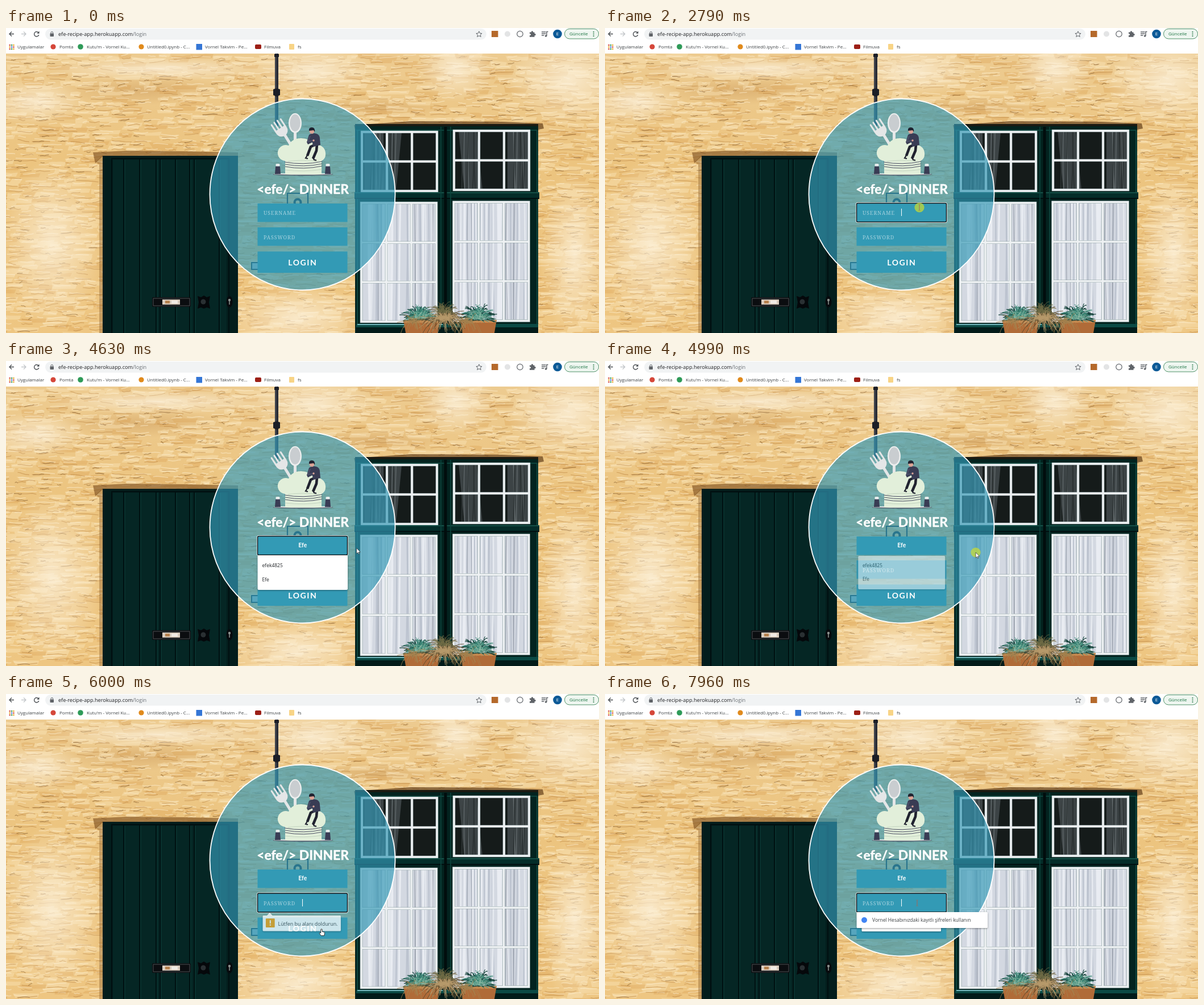
Recreate the animation shown at these times as an HTML page. Size 1043 by 537 pixels, loop 8000 ms.

```html
<!DOCTYPE html>
<html lang="tr">
<head>
<meta charset="utf-8">
<title>Login</title>
<style>
  html, body { margin: 0; width: 100%; height: 100%; overflow: hidden; background: #fff; }
  svg { position: absolute; left: 0; top: 0; width: 100%; height: 100%; display: block; }
  #ui { will-change: transform; }
  text { font-family: "Open Sans", "Noto Sans", sans-serif; white-space: pre; }
  .comic { font-family: Lato, "Open Sans", sans-serif; font-weight: 700; fill: #fff; }
  .hint { font-family: "Noto Serif", serif; font-size: 8.8px; letter-spacing: 1px; fill: #a9d3df; }
</style>
</head>
<body>
<svg id="photo" viewBox="0 0 1043 537" preserveAspectRatio="none"></svg>
<svg id="ui" viewBox="0 0 1043 537" preserveAspectRatio="none"></svg>
<script>
const LOOP = 8000;
const TICK = 67.46;
const $ = id => document.getElementById(id);

let seed = 7;
const rnd = (a = 0, b = 1) => {
  seed = (seed * 16807) % 2147483647;
  return a + (b - a) * seed / 2147483647;
};
const n = v => v.toFixed(1);
const box = (x, y, w, h, fill, more = '') =>
  `<rect x="${x}" y="${y}" width="${w}" height="${h}" fill="${fill}" ${more}/>`;
const dot = (x, y, r, fill, more = '') => `<circle cx="${x}" cy="${y}" r="${r}" fill="${fill}" ${more}/>`;
const oval = (x, y, rx, ry, fill, more = '') =>
  `<ellipse cx="${x}" cy="${y}" rx="${rx}" ry="${ry}" fill="${fill}" ${more}/>`;
const line = (d, color, width = 1, more = '') =>
  `<path d="${d}" fill="none" stroke="${color}" stroke-width="${width}" ${more}/>`;
const shape = (d, fill, more = '') => `<path d="${d}" fill="${fill}" ${more}/>`;
const label = (x, y, str, size = 8, fill = '#3c4043', more = '') =>
  `<text x="${x}" y="${y}" font-size="${size}" fill="${fill}" ${more}>${str}</text>`;

/* ---------- photo ---------- */

function jagged(x, y, w, rough) {
  let d = `M${n(x)} ${n(y)}`;
  for (let i = 0; i < 4; i++) d += `l${n(w / 4 * rnd(.6, 1.4))} ${n(rnd(-rough, rough))}`;
  return d;
}

// Rough brick courses: toned faces, dark cracks, lit edges.
function wall() {
  let pale = '', tan = '', crack = '', deep = '', lit = '';
  for (let y = 48; y < 540; y += 9) {
    for (let x = -20; x < 1043;) {
      const w = rnd(18, 48), yy = y + rnd(-3, 3), face = jagged(x, yy, w, 1.5) + `l-3 7h${n(-w * .85)}z`;
      if (rnd() < .4) pale += face; else if (rnd() < .3) tan += face;
      if (rnd() < .75) crack += jagged(x + rnd(0, 8), yy + 7, w * rnd(.4, .9), 1.6);
      if (rnd() < .22) deep += jagged(x + rnd(0, 12), yy + 7.5, w * rnd(.2, .5), 1.4);
      lit += jagged(x + rnd(0, 8), yy + rnd(1, 4), w * rnd(.4, .8), 1.2);
      x += w;
    }
  }
  return shape(pale, '#fae6bb', 'opacity=".4"') + shape(tan, '#d69d4e', 'opacity=".3"')
    + line(lit, '#fdf0d2', 1.5, 'opacity=".5"') + line(crack, '#bb8440', 1.3, 'opacity=".5"')
    + line(deep, '#7c5426', 1.1, 'opacity=".55"');
}

const patch = (x, y, rx, ry, tone) => oval(x, y, rx, ry, `url(#${tone})`);

// Soft vertical creases of a curtain.
function folds(x, y, w, h, count, color, width, opacity) {
  let d = '';
  for (let i = 0; i < count; i++) {
    const px = x + rnd(.03, .97) * w;
    d += `M${n(px)} ${y}q${n(rnd(-2, 2))} ${n(h / 2)} ${n(rnd(-3, 3))} ${h}`;
  }
  return line(d, color, width, `opacity="${opacity}"`);
}

function bars(x, y, w, h, rows) {
  let d = `M${x} ${y}h${w}v${h}h${-w}z`;
  for (let i = 1; i < 3; i++) d += `M${n(x + w * i / 3)} ${y}v${h}`;
  for (let i = 1; i < rows; i++) d += `M${x} ${n(y + h * i / rows)}h${w}`;
  return line(d, '#8fa3a3', 4.6) + line(d, '#eef1f3', 3.4);
}

function upperSash(x, y, drapes) {
  return box(x, y, 132, 104, '#151b1a')
    + drapes.map(([dx, w, lean]) => shape(`M${x + dx} ${y}h${w}l${lean} 104h${-w}z`, '#5d6468', 'opacity=".55"')
      + folds(x + dx + lean / 2, y, w, 104, 5, '#9ea5a9', 1.5, .35)
      + folds(x + dx + lean / 2, y, w, 104, 4, '#1c2222', 2, .5)).join('')
    + bars(x, y, 132, 104, 2);
}

function lowerSash(x, y) {
  return box(x, y, 132, 209, '#d3d8e1')
    + folds(x, y, 132, 209, 18, '#9aa3b3', 2.4, .4)
    + folds(x, y, 132, 209, 20, '#f3f5f9', 3, .7)
    + folds(x, y, 132, 209, 6, '#5f6978', 1.2, .45)
    + bars(x, y, 132, 209, 3);
}

// Grass blades fanning out from a base, bending down by `sag`.
function tuft(x, y, r, count, color, width, sag = 0) {
  let d = '';
  for (let i = 0; i < count; i++) {
    const a = rnd(-3.1, -.04), len = r * rnd(.4, 1), dx = Math.cos(a) * len, dy = Math.sin(a) * len;
    d += `M${n(x + rnd(-9, 9))} ${n(y + rnd(-3, 3))}q${n(dx * .5)} ${n(dy * .8)} ${n(dx)} ${n(dy * .8 + sag * rnd())}`;
  }
  return line(d, color, width);
}

function door() {
  let s = shape('M153 219l60-3 100 1 95 2v7H170l-13 12z', '#8a5d2a', 'opacity=".7"')
    + shape('M157 236l13-12v313h-6V240z', '#8a5d2a', 'opacity=".4"')
    + box(170, 225, 238, 312, '#031d1c') + box(188, 232, 200, 305, '#052624');
  for (const x of [207, 235, 264, 271, 298, 323, 331, 375])
    s += line(`M${x} 230v307`, '#010f10', 1.8) + line(`M${x + 2} 232v305`, '#0d3b37', 1);
  return s + line('M186 537V230h206v307', '#010f10', 2)
    + box(257, 474, 68, 17, '#0b0d10', 'rx="2"') + line('M259 476h64v13h-64z', '#4a5052', 1)
    + box(275, 478, 31, 9, '#d9cbbd') + box(280, 480, 8, 5, '#b6814f') + box(291, 480, 11, 5, '#f2ece6')
    + shape('M337 472l6 2 5-3 5 3 6-2-2 11 2 11-6-2-5 2-5-2-6 2 2-11z', '#05080b') + dot(347, 482, 4.5, '#2a3033')
    + oval(393, 482, 5.5, 10, '#070a0d') + dot(393, 479, 2.2, '#8a8f8c') + line('M393 480v7', '#8a8f8c', 1.6);
}

function flowers() {
  let s = shape('M699 514h64l-4 23h-56zM799 514h64l-4 23h-56z', '#b06b38')
    + shape('M699 514h64l-1 5h-62zM799 514h64l-1 5h-62z', '#c9894f');
  for (const x of [729, 830])
    s += tuft(x, 512, 33, 110, '#123f38', 1.1, 8) + tuft(x, 510, 30, 90, '#3f8c7b', .9, 8)
      + tuft(x, 512, 30, 24, '#9ec3ad', .6, 10);
  return s + tuft(770, 514, 40, 90, '#5d4a2c', .9, 34) + tuft(771, 512, 38, 90, '#b79a6b', .8, 38)
    + tuft(770, 500, 27, 50, '#6c6a44', .8, 12)
    + tuft(715, 518, 24, 40, '#a5824e', .8, 30) + tuft(812, 518, 24, 40, '#a5824e', .8, 30);
}

function windowFrame() {
  return shape('M612 171l100-7 160 1 72 3 2 9-10 2H614z', '#6e4820', 'opacity=".75"')
    + box(614, 169, 322, 368, '#03231f') + box(614, 169, 322, 4, '#1b1a12')
    + line('M616 180h318M618 180v357M934 180v357', '#0d443c', 2)
    + upperSash(626, 183, [[4, 34, 0], [44, 26, -10]]) + upperSash(788, 181, [[8, 32, 10], [94, 36, 0]])
    + box(613, 289, 325, 12, '#042d29') + line('M613 290h325', '#1d5c52', 1.5) + line('M613 300h325', '#010f10', 2)
    + line('M765 174v348M782 174v348', '#0d443c', 1.6) + line('M773 174v348', '#010d0d', 5)
    + lowerSash(625, 308) + lowerSash(787.5, 306.5)
    + box(616, 521, 320, 6, '#0b4a45') + line('M618 522h150', '#73b8bd', 2) + box(616, 527, 320, 10, '#021b19')
    + flowers();
}

const glow = (id, color, o) => `<radialGradient id="${id}"><stop offset="0" stop-color="${color}" stop-opacity="${o}"/>
  <stop offset="1" stop-color="${color}" stop-opacity="0"/></radialGradient>`;

$('photo').innerHTML = `<defs>
  <linearGradient id="plaster" x2="0" y2="1"><stop offset="0" stop-color="#edcb90"/>
    <stop offset=".4" stop-color="#ecc47f"/><stop offset="1" stop-color="#eec682"/></linearGradient>
  ${glow('pale', '#fdf3df', .75)}${glow('tan', '#b98141', .3)}</defs>`
  + box(0, 45, 1043, 492, 'url(#plaster)')
  + patch(240, 110, 150, 25, 'tan') + patch(650, 140, 120, 20, 'tan')
  + wall()
  + patch(790, 70, 70, 60, 'pale') + patch(990, 90, 110, 80, 'pale') + patch(540, 75, 110, 45, 'pale')
  + patch(270, 72, 200, 22, 'pale') + patch(50, 130, 90, 40, 'pale') + patch(1000, 400, 60, 150, 'pale')
  + patch(510, 510, 130, 60, 'pale') + patch(80, 380, 90, 150, 'pale')
  + door() + windowFrame()
  + box(473, 45, 6, 128, '#2a2d36') + line('M474.5 45v120', '#5a5d66', 1)
  + shape('M470 108l6-2 6 2v10l-6 3-6-3z', '#1c1e26') + box(472, 46, 8, 5, '#1c1e26')
  + line('M495 291h36v28h-36z', '#132c38', 2.2) + dot(513, 307, 5.5, 'none', 'stroke="#132c38" stroke-width="4"')
  + box(432, 413, 14, 12, '#9fc0cc', 'stroke="#123a4c" stroke-width="2"');

/* ---------- browser bar ---------- */

function browser() {
  const grey = '#5f6368';
  let s = box(0, 0, 1043, 45, '#fff') + box(69, 1, 776, 19.5, '#f1f3f4', 'rx="9.7"')
    + line('M14 10.5H6m4-4l-4 4 4 4', '#4a4e52', 1.3) + line('M27 10.5h8m-4-4l4 4-4 4', '#c3c6c9', 1.3)
    + line('M57 8a4.2 4.2 0 1 0 .8 4', '#4a4e52', 1.4) + shape('M58.5 5.5v4.2h-4.2z', '#4a4e52')
    + box(77.5, 9.5, 6.5, 5.5, grey, 'rx=".8"') + line('M79 10V8.3a1.8 1.8 0 0 1 3.6 0V10', grey, 1)
    + label(92, 14.2, 'efe-recipe-app.herokuapp.com<tspan fill="#6b7075">/login</tspan>', 9.15, '#202124')
    + line('M832 5.8l1.5 3.4 3.6.3-2.7 2.4.8 3.6-3.2-1.9-3.2 1.9.8-3.6-2.7-2.4 3.6-.3z', grey)
    + box(854, 5, 11.5, 11, '#b5692b') + dot(882, 10.5, 5, '#e3e4e5')
    + dot(904, 10.5, 5.2, 'none', `stroke="${grey}" stroke-width="1.2"`)
    + shape('M921 7.5h3a1.6 1.6 0 1 1 3 0h2.6v2.6a1.6 1.6 0 1 1 0 3v2.6h-8.6v-2.8a1.5 1.5 0 1 0 0-2.8z', grey)
    + line('M942 7h7.5M942 10h7.5M942 13h4.5M951 14V6.5h2.5', grey, 1.4) + dot(949.6, 14, 1.8, grey)
    + dot(970, 10.5, 7.8, '#0d5a97') + label(970, 13.4, 'E', 8, '#fff', 'text-anchor="middle"')
    + box(982.5, 1.5, 60, 17.5, '#eef6f0', 'rx="8.7" stroke="#4f9168"') + label(991, 13.3, 'Güncelle', 8, '#1a7340');
  for (const y of [7, 10.5, 14]) s += dot(1033.5, y, 1.1, '#2f7a4c');
  const apps = ['#d5473a', '#3f7be0', '#e9a820', '#38985a'];
  for (let i = 0; i < 9; i++) s += box(5.5 + i % 3 * 3.4, 29 + (i / 3 | 0) * 3.4, 2.3, 2.3, apps[(i * 3 + (i / 3 | 0)) % 4]);
  s += dot(83, 33, 4.6, '#d5473a') + dot(131, 33, 4.8, '#2e9a58') + dot(238, 33, 4.6, '#e08a1c')
    + box(334.5, 28, 10.5, 10.5, '#3476d6') + box(438, 29, 11, 8, '#9c1f16', 'rx="2"') + box(498, 28, 9, 10, '#f8d486', 'rx="1"');
  const marks = [[20, 'Uygulamalar'], [94, 'Pomta'], [142, "Kutu'm - Vornel Ku..."], [248, 'Untitled0.ipynb - C...'],
    [350, 'Vornel Takvim - Pe...'], [454, 'Filmuva'], [513, 'fs']];
  return s + marks.map(([x, str]) => label(x, 35.8, str)).join('');
}

/* ---------- login card ---------- */

function chefArt() {
  const ink = '#393c54', steel = '#e4e6e7';
  let s = oval(522, 257.5, 53, 2.2, ink) + oval(522, 257, 52, 1.5, '#dfe8e6')
    + line('M487 183L503 209', steel, 5, 'stroke-linecap="round"')
    + shape('M-11-22q1.5-3 3 0v13h3.3v-14q1.5-3 3 0v14h3.4v-14q1.5-3 3 0v14h3.3v-13q1.5-3 3 0v16q0 11-11 13-11-2-11-13z',
      steel, 'transform="translate(487 184) rotate(-33)"')
    + box(506, 180, 5, 26, steel) + oval(508.5, 167.5, 11.5, 17.5, '#eceeee') + oval(508.5, 167, 9.2, 15, '#c9cdd0')
    + shape('M491 258V234a14 14 0 1 1 6-27q6-13 22-13 15 0 22 11 15-1 20 10 4 14-6 19v24z', '#e2efda')
    + line('M490 236q33 6 66-1M491 240q33 6 65-1M491 244q33 6 65-1', ink, .9)
    + line('M491 250q33 4 65-1M496 235q26-4 54 0', '#b9ccb8', .8);
  for (const x of [478, 566])
    s += shape(`M${x - 5} 257l1-13q4-3 8 0l1 13z`, ink) + box(x - 3.5, 239, 7, 4.5, '#e9eeee', 'rx="1.5"');
  return s
    + line('M547 204L536 209 530 225M547 205L546 216 540 230', '#20222f', 4.6, 'stroke-linejoin="round"')
    + line('M530 224l-3 5 4 1M540 229l2 3 4 1', '#20222f', 2.2)
    + shape('M533 188q6-4 13-2 6 2 6 9l1 11-13 3-1-8-8 4-2-4z', ink)
    + line('M535 190l-4 10 10-2', '#4b4f69', 2) + dot(541, 198, 1.7, '#dba497')
    + dot(538, 182, 4.3, '#dba497') + shape('M533 181q-1-6 5-6 6 0 5 8l-2-3z', '#20222f');
}

const field = (y, h) => box(442.5, y, 158, h, '#339ab5');
const outline = (id, y) => `<g id="${id}">` + box(441.5, y - 1, 160, 35, 'none', 'rx="2.5" stroke="#fff"')
  + box(442.5, y, 158, 33, 'none', 'rx="2" stroke="#101418" stroke-width="1.5"') + '</g>';
const shadow = 'style="filter:drop-shadow(0 1px 1.5px rgba(0,0,0,.4))"';

$('ui').innerHTML = browser()
  + oval(521.5, 293, 163, 168.5, '#3498b6', 'fill-opacity=".68" stroke="#fff" stroke-width="1.8"')
  + chefArt()
  + '<text class="comic" x="522" y="292" font-size="22.8" text-anchor="middle" stroke="#fff" stroke-width=".5" stroke-linejoin="round">&lt;efe/&gt; DINNER</text>'
  + field(309, 32.5) + field(351, 32.5) + field(393.5, 37.5)
  + '<text id="userHint" class="hint" x="453" y="328.5">USERNAME</text><text class="hint" x="453" y="371.5">PASSWORD</text>'
  + '<text class="comic" x="521.8" y="417.8" font-size="14" letter-spacing="1.6" text-anchor="middle">LOGIN</text>'
  + '<text id="user" class="comic" x="521.8" y="328.3" font-size="10.4" text-anchor="middle"></text>'
  + outline('userRing', 308.5) + outline('passRing', 351)
  + box(521, 318, 1, 13, '#fff', 'id="caret"')
  + `<g id="list"><rect id="listBox" x="442.5" y="342" width="158.5" height="61" rx="2" fill="#fff" ${shadow}/>`
  + ['efek4825', 'Efe', 'deneme', 'misafir'].map((str, i) => label(450.5, 362.8 + i * 25, str, 8.5, '#24272a', 'class="row"')).join('') + '</g>'
  + `<g id="tip"><path d="M453 390h6l5-5 5 5h120.500q1.500 0 1.500 1.500v25q0 1.500-1.500 1.500H453q-1.500 0-1.500-1.500v-25q0-1.500 1.500-1.500z" fill="#fff" ${shadow}/>`
  + box(457, 395.5, 16, 16, '#f5a00f', 'rx="1"') + box(464, 398.5, 2, 6, '#fff') + box(464, 406, 2, 2, '#fff')
  + label(479, 408, 'Lütfen bu alanı doldurun.', 9, '#3a3d40') + '</g>'
  + '<g id="saved">' + box(442.5, 384, 230.5, 28, '#fff', 'rx="1.5" ' + shadow) + dot(456, 398, 5, '#4285f4')
  + label(470, 401.3, 'Vornel Hesabınızdaki kayıtlı şifreleri kullanın', 8.5, '#3c4043') + '</g>'
  + dot(0, 0, 8.6, '#c9dc33', 'id="press" fill-opacity=".72"')
  + '<g id="pointer">'
  + shape('M0 0v9.5l2.3-2 1.4 3.1 1.4-.6-1.4-3.1h3z', '#fff', 'id="arrow" stroke="#333" stroke-width=".7"')
  + line('M-1.8-5.5q1.800 0 1.800 1.500v8q0 1.500-1.800 1.500M1.800-5.500q-1.800 0-1.800 1.500v8q0 1.500 1.800 1.500', '#a5695a', .8, 'id="beam" opacity=".75"')
  + shape('M-1.3 7V1a1.2 1.2 0 0 1 2.4 0v3.4l3.600.8q1 .3.8 1.5l-.8 4.8h-5.2L-3.6 8q-.4-1.900 1-1.600z', '#fff', 'id="hand" stroke="#222" stroke-width=".9"')
  + '</g>';

/* ---------- timeline ---------- */

// first and last change, from x, y, to x, y
const moves = [
  [540, 750, 1070, 574, 808, 294],
  [950, 1150, 808, 294, 596, 277],
  [1550, 1820, 596, 277, 571, 312],
  [2230, 2640, 571, 312, 553, 316],
  [4370, 4780, 553, 316, 652, 337],
  [5060, 5650, 652, 337, 555, 414],
  [6210, 6950, 555, 414, 549, 368]
];
const presses = [[2710, 2840], [4920, 5060], [5790, 5930], [7020, 7150]];
const keys = [[2770, ''], [3580, 'E'], [3780, 'Ef'], [3910, 'Efe']];

const within = (v, a, b) => v >= a && v < b;
const clamp = v => Math.max(0, Math.min(1, v));
const smooth = k => k * k * (3 - 2 * k);
const blink = (t, since) => Math.floor((t - since) / 530) % 2 === 0;
const show = (id, on) => { $(id).style.display = on ? '' : 'none'; };
const rows = [...document.querySelectorAll('.row')];

function pointerAt(t) {
  const [a, b, x0, y0, x1, y1] = moves.filter(m => t >= m[0]).pop() || moves[0];
  const k = smooth(clamp((t - a + TICK / 2) / (b - a + TICK)));
  return [x0 + (x1 - x0) * k, y0 + (y1 - y0) * k];
}

function pointerKind(x, y) {
  if (!within(x, 443, 602)) return 'arrow';
  if (within(y, 393, 431)) return 'hand';
  return within(y, 272, 296) || within(y, 309, 342) || within(y, 351, 384) ? 'beam' : 'arrow';
}

function draw(t) {
  const [x, y] = pointerAt(t), kind = pointerKind(x, y);
  for (const id of ['pointer', 'press']) $(id).setAttribute('transform', `translate(${n(x)} ${n(y)})`);
  for (const id of ['arrow', 'beam', 'hand']) show(id, id === kind);
  show('pointer', t >= moves[0][0]);
  show('press', presses.some(([a, b]) => within(t, a, b)));

  const [since, typed] = keys.filter(k => t >= k[0]).pop() || keys[0];
  const user = $('user'), onUser = within(t, 2770, 4920), onPass = t >= 5820;
  if (user.textContent !== typed) user.textContent = typed;
  show('userHint', !typed);
  show('userRing', onUser);
  show('passRing', onPass);
  show('caret', onUser && blink(t, since) || onPass && blink(t, 5820));
  const half = onUser && typed ? user.getComputedTextLength() / 2 + .6 : 0;
  $('caret').setAttribute('x', n(521 + half));
  $('caret').setAttribute('y', onPass ? 361 : 318);

  const out = clamp((t - 4925) / 200), full = t < 3580;
  show('list', t >= 2840 && out < 1);
  $('list').setAttribute('opacity', 1 - out);
  $('list').setAttribute('transform', `translate(521.5 373) scale(${1 - .07 * out}) translate(-521.5 -373)`);
  $('listBox').setAttribute('height', full ? 111 : 61);
  rows.forEach((r, i) => { r.style.display = full || i < 2 ? '' : 'none'; });

  const tip = smooth(clamp((t - 5810) / 440) ** .6);
  show('tip', tip > 0);
  $('tip').setAttribute('opacity', tip);
  $('tip').setAttribute('transform', `translate(452 385) scale(${.94 + .06 * tip}) translate(-452 -385)`);
  show('saved', t >= 7150);
}

const begin = performance.now();
function frame() {
  const t = (performance.now() - begin) % LOOP;
  draw((Math.floor((t + 6) / TICK) + .5) * TICK);
  requestAnimationFrame(frame);
}
frame();
</script>
</body>
</html>
```
